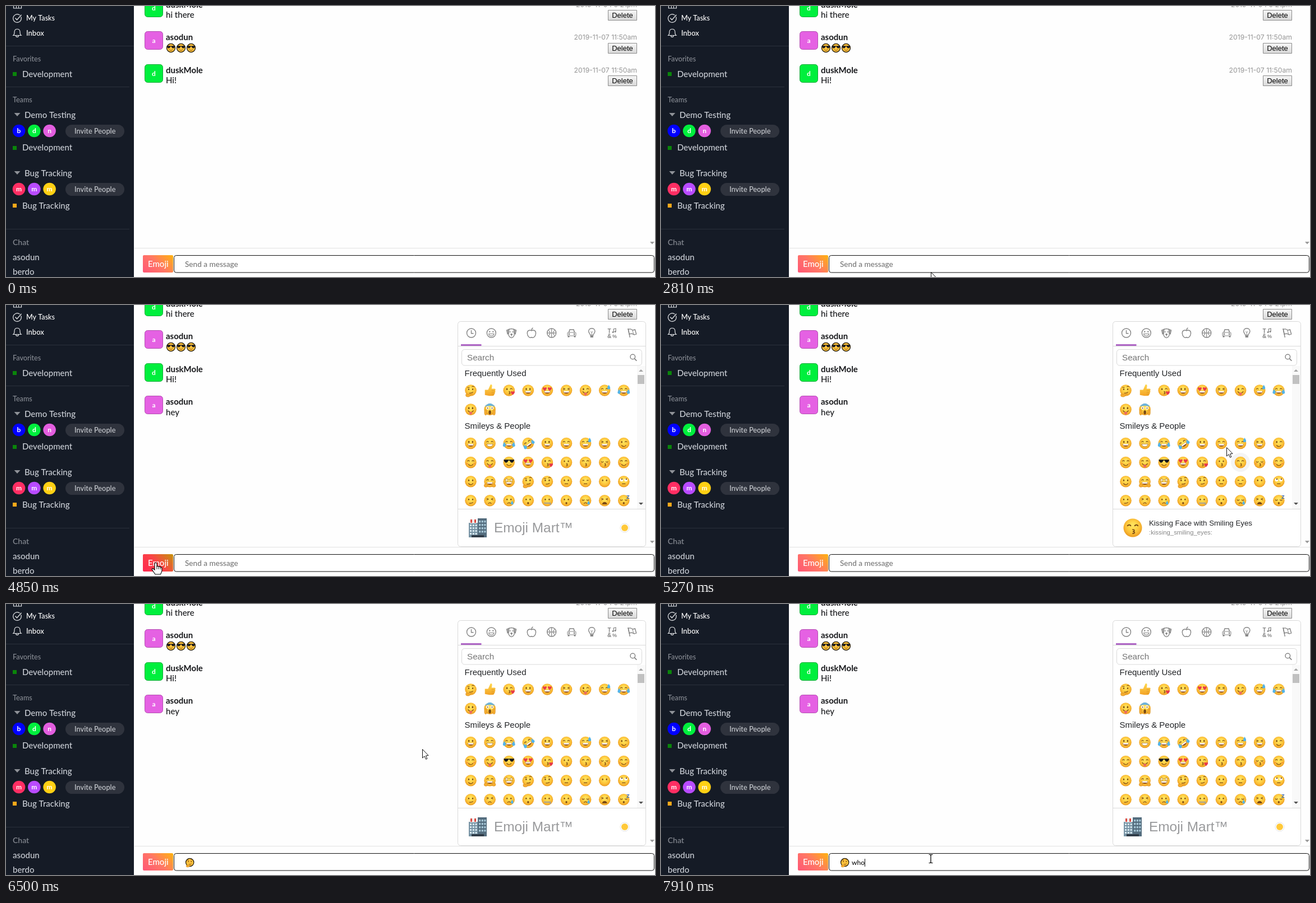
Animation of 1157x484 px, one loop 8 s. Source, as an HTML page with a canvas:

```html
<!DOCTYPE html>
<html lang="en">
<head>
<meta charset="utf-8">
<title>Team chat</title>
<style>
html, body { margin: 0; width: 100%; height: 100%; overflow: hidden; background: #fefefe; }
canvas { display: block; width: 1157px; height: 484px; }
</style>
</head>
<body>
<canvas id="stage" width="1157" height="484"></canvas>
<script>
const ctx = document.getElementById('stage').getContext('2d');
const LOOP = 8000;
const STEP = 30;
const TAU = Math.PI * 2;
const LATO = 'Lato, "Open Sans", sans-serif';
const SANS = '"Liberation Sans", Arial, sans-serif';
const INTER = 'Inter, sans-serif';
const BROWN = '#7a4a14';

// ---------- helpers ----------
function text(str, x, y, size, color, family = LATO, weight = 500, align = 'left') {
  ctx.font = `${weight} ${size}px ${family}`;
  ctx.textAlign = align;
  ctx.fillStyle = color;
  ctx.fillText(str, x, y);
}
function rect(x, y, w, h, color) {
  ctx.fillStyle = color;
  ctx.fillRect(x, y, w, h);
}
function paint(fill, stroke, width = 1) {
  if (fill) { ctx.fillStyle = fill; ctx.fill(); }
  if (stroke) { ctx.strokeStyle = stroke; ctx.lineWidth = width; ctx.stroke(); }
}
function box(x, y, w, h, r, fill, stroke) {
  ctx.beginPath();
  ctx.roundRect(x, y, w, h, r);
  paint(fill, stroke);
}
function oval(x, y, rx, ry, fill, stroke, width) {
  ctx.beginPath();
  ctx.ellipse(x, y, rx, ry, 0, 0, TAU);
  paint(fill, stroke, width);
}
function disc(x, y, r, fill, stroke, width) { oval(x, y, r, r, fill, stroke, width); }
function arc(x, y, r, from, to, color, width = 1.2) {
  ctx.beginPath();
  ctx.arc(x, y, r, from * Math.PI, to * Math.PI);
  paint(null, color, width);
}
function poly(points, fill, stroke, width, closed = true) {
  ctx.beginPath();
  for (let i = 0; i < points.length; i += 2) ctx.lineTo(points[i], points[i + 1]);
  if (closed) ctx.closePath();
  paint(fill, stroke, width);
}
function line(points, color, width = 1) { poly(points, null, color, width, false); }
function path(d, fill, stroke, width = 1) {
  const p = new Path2D(d);
  if (fill) { ctx.fillStyle = fill; ctx.fill(p); }
  if (stroke) { ctx.strokeStyle = stroke; ctx.lineWidth = width; ctx.stroke(p); }
}
function at(x, y, scale, draw) {
  ctx.save();
  ctx.translate(x, y);
  ctx.scale(scale, scale);
  draw();
  ctx.restore();
}
function blend(gradient, colors) {
  colors.forEach((c, i) => gradient.addColorStop(i / (colors.length - 1), c));
  return gradient;
}
function ramp(x0, y0, x1, y1, ...colors) {
  return blend(ctx.createLinearGradient(x0, y0, x1, y1), colors);
}

// ---------- emoji faces, drawn in a circle of radius 10 ----------
const both = draw => [-1, 1].forEach(draw);
function heart(x, y, s) {
  at(x, y, s, () => path('M0 3C-5 -1 -2.5 -4 0 -1.6C2.5 -4 5 -1 0 3Z', '#e83a48'));
}
function drop(x, y, s) {
  at(x, y, s, () => path('M0 -3C1 -1 2 0 2 1.3A2 2 0 0 1 -2 1.3C-2 0 -1 -1 0 -3Z', '#52b4ea'));
}
const wideEye = (s, r) => disc(s * 3.8, -2.6, r, '#fff');
const eyes = {
  d: () => both(s => oval(s * 3.4, -2, 1.1, 1.5, BROWN)),
  o: () => both(s => oval(s * 3.2, -2.4, 1.2, 1.8, BROWN)),
  u: () => both(s => arc(s * 3.9, -1.3, 1.9, 1.08, 1.92, BROWN)),
  n: () => both(s => arc(s * 4, -2.2, 1.9, 0.08, 0.92, BROWN)),
  x: () => both(s => line([s * 5.6, -4, s * 2.5, -2.4, s * 5.6, -1], BROWN, 1.1)),
  w: () => { oval(-3.5, -2.2, 1.2, 1.7, BROWN); arc(3.9, -1.3, 1.9, 1.08, 1.92, BROWN); },
  h: () => both(s => heart(s * 4.3, -2.6, 1.15)),
  s: () => both(s => {
    const star = [];
    for (let i = 0; i < 10; i++) {
      const a = i * Math.PI / 5 - Math.PI / 2, r = i % 2 ? 1.6 : 3.7;
      star.push(s * 4 + r * Math.cos(a), -2.4 + r * Math.sin(a));
    }
    poly(star, '#f7eccb', '#b8822a', 0.7);
  }),
  g: () => {
    rect(-9, -4.6, 18, 1.4, '#17181c');
    both(s => path(`M${s} -4.4H${s * 8.6}C${s * 8.6} 2.3 ${s * 1.4} 2 ${s} -4.4Z`, '#17181c'));
  },
  '-': () => both(s => line([s * 2, -2, s * 5.2, -2], BROWN, 1.2)),
  r: () => both(s => { wideEye(s, 2.7); disc(s * 3.8 + 0.6, -4, 1.2, BROWN); }),
  k: () => both(s => { wideEye(s, 2.5); disc(s * 3.8, -2.4, 1, BROWN); })
};
const GRIN = 'M-5.4 1.2H5.4C5 7.2 -5 7.2 -5.4 1.2Z';
const mouths = {
  g: () => { path(GRIN, '#8c4a20'); path('M-4.9 1.3H4.9L4.2 3.6H-4.2Z', '#fff'); },
  t: () => path(GRIN, '#fff', '#96601f', 0.7),
  s: () => arc(0, 0.8, 4.6, 0.17, 0.83, BROWN),
  k: () => path('M-0.5 1.8C3 1.8 1.8 4 0 4C2.8 4 2.8 6.2 -0.5 6.2', null, BROWN, 1),
  o: () => oval(0, 4.4, 1.6, 1.9, BROWN),
  '-': () => line([-3, 4, 3, 4], BROWN, 1.2),
  _: () => {},
  f: () => arc(0, 7.2, 3.4, 1.2, 1.8, BROWN),
  T: () => {
    arc(0, -0.2, 5, 0.12, 0.88, BROWN);
    path('M-2.3 4.2H2.3V6.6A2.3 2.2 0 0 1 -2.3 6.6Z', '#ee6a62');
  },
  m: () => path('M-2.6 4.4Q1 5.2 4 3', null, BROWN, 1.2),
  z: () => { rect(-5.6, 3.4, 11.2, 1.9, '#b4b3a8'); line([-5.6, 4.4, 5.6, 4.4], '#777', 0.5); rect(4.5, 4, 1.8, 3.6, '#9a9fa3'); },
  O: () => oval(0, 5, 2.2, 3.6, BROWN),
  y: () => path('M-4.4 6.6C-3.6 1 3.6 1 4.4 6.6Z', BROWN)
};
const SKIN = '#f6ac30', SKIN_EDGE = '#cf8a20';
const extras = {
  j: () => both(s => drop(s * 8, 1.8, 1.3)),
  w: () => drop(7.2, -6, 1.25),
  q: () => drop(5.4, 3.4, 1.1),
  c: () => heart(6.6, 4.4, 1.15),
  b: () => both(s => oval(s * 6.3, 2.2, 2, 1.3, 'rgba(240,100,50,.4)')),
  B: () => { line([-6, -5, -2, -5.2], BROWN); line([1.8, -6, 4, -7.2, 6.2, -6.2], BROWN); },
  H: () => path('M-8 10.4C-10 6 -6.6 5 -5.2 7L1.6 5.2C3.4 4.9 3.4 6.8 2 7.1L-1 8C0 10.6 -4 12.4 -8 10.4Z', SKIN, SKIN_EDGE, 0.6),
  h: () => both(s => oval(s * 6.8, 7, 3.2, 2.8, SKIN, SKIN_EDGE, 0.6)),
  l: () => {
    path('M-9 -5Q0 -16 9 -5Q0 -8 -9 -5Z', '#6db4dc');
    both(s => oval(s * 7.2, 5, 2.2, 4.8, SKIN, SKIN_EDGE, 0.6));
  },
  Z: () => text('Z', 4.5, -3, 9, '#3568b6', SANS, 700),
  r: () => {}
};
function thumb() {
  path('M-3 -1L1 -10C4 -11 4.6 -8.4 3 -3H8.4C10.4 -2.6 9.8 0 9 .4C10 1.4 9.6 3.2 8.6 3.6C9.2 5 8.4 6.4 7.4 6.6C7.6 8.6 6.6 9.4 4.6 9.4H-1L-8.6 8V-1Z',
    ramp(0, -10, 0, 10, '#ffd84e', '#f3a125'));
  [0.4, 3.6, 6.6].forEach(y => line([3, y, 8, y], SKIN_EDGE, 0.6));
}
function face(x, y, r, code, outlined) {
  at(x, y, r / 10, () => {
    if (code === '+') return thumb();
    if (code.includes('r', 2)) ctx.rotate(-0.6);
    if (outlined) disc(0, 0, 9.4, '#ffc23c', '#1c1509', 1.6);
    else disc(0, 0, 10, blend(ctx.createRadialGradient(0, -3, 1, 0, -1, 11), ['#ffe25e', '#ffd64b', '#fbc038', '#eb9a22']));
    eyes[code[0]]();
    mouths[code[1]]();
    for (const e of code.slice(2)) extras[e]();
  });
}

// ---------- sidebar ----------
function members(y, list) {
  list.forEach(([letter, color], i) => {
    const x = 23 + 27.3 * i;
    disc(x, y, 11.3, color);
    text(letter, x, y + 4, 12, '#fff', LATO, 700, 'center');
  });
  box(106, y - 11, 105, 23, 11.5, '#2f333d');
  text('Invite People', 122, y + 5, 12.8, '#c8cbd0');
}
function sidebar() {
  const pale = '#ccd0d7', dim = '#878b93', ink = '#e6e8ea';
  rect(0, 0, 228, 484, '#151b26');
  rect(0, 71, 228, 1, '#2b303b');
  rect(0, 144, 220, 1, '#2b303b');
  rect(0, 398, 220, 1, '#2b303b');

  line([13.5, 0, 13.5, 4, 27.5, 4, 27.5, 0], ink, 1.2);
  line([18.5, 0, 18.5, 4], ink);
  line([22.5, 0, 22.5, 4], ink);
  arc(20, 22, 7.3, -0.12, 1.72, ink);
  line([16.5, 21.5, 19.5, 24.8, 27.5, 15.8], ink, 1.3);
  path('M13 52.5C15 51 15 49 15 46.5C15 39.5 25 39.5 25 46.5C25 49 25 51 27 52.5Z', null, ink, 1.2);
  arc(20, 53, 2.3, 0, 1, ink);
  text('My Tasks', 36, 26, 12.6, '#fff');
  text('Inbox', 36, 53, 13, '#fff');

  text('Favorites', 12, 99, 12.6, dim);
  text('Teams', 12, 172, 12.6, dim);
  text('Chat', 12, 427, 14, dim);
  [126.5, 258].forEach(y => {
    rect(12, Math.floor(y) - 8, 7, 7, '#0a850a');
    text('Development', 29, y, 15, pale);
  });
  [['Demo Testing', 200], ['Bug Tracking', 304]].forEach(([name, y]) => {
    poly([14.5, y - 9, 25.5, y - 9, 20, y - 3], '#8f9298');
    text(name, 33, y, 15, pale);
  });
  members(223, [['b', '#0000ff'], ['d', '#00ef3d'], ['n', '#e35edf']]);
  members(327, [['m', '#ff2e63'], ['m', '#b94bff'], ['m', '#ffd014']]);
  rect(12, 353, 7, 7, '#ffa81a');
  text('Bug Tracking', 29, 362, 15, pale);
  text('asodun', 12, 454, 15, pale);
  text('berdo', 12, 480, 15, pale);
}

// ---------- messages ----------
const users = {
  asodun: ['#e561e3', '#b24fb0'],
  duskMole: ['#00ef3d', '#14a83a']
};
function message(top, name, body, date) {
  const [fill, edge] = users[name];
  const y = Math.round(top), low = Math.floor(top);
  box(247.5, y + 0.5, 32, 32, 5, fill, edge);
  text(name[0], 263.5, y + 21, 12, '#fff', LATO, 700, 'center');
  text(name, 285, y + 16, 15, '#17181b', LATO, 700);
  if (body) text(body, 285, low + 35, 15, '#17181b');
  else for (let i = 0; i < 3; i++) face(294 + 18 * i, y + 30, 8, 'gs', true);
  text(date, 1125, y + 15, 12.2, '#959595', INTER, 400, 'right');
  box(1073.5, low + 21.5, 51, 18, 0, ramp(0, low + 21, 0, low + 40, '#f7f7f7', '#d8d8d8'), '#8c8c8c');
  text('Delete', 1099, low + 35, 13, '#000', SANS, 400, 'center');
}
function messages(t) {
  message(-13.5, 'duskMole', 'hi there', '2019-11-04 5:21pm');
  message(45, 'asodun', '', '2019-11-07 11:50am');
  message(103.5, 'duskMole', 'Hi!', '2019-11-07 11:50am');
  if (t >= 4220) message(162, 'asodun', 'hey', '2019-11-07 11:51am');
  poly([1148, 421, 1156, 421, 1152, 425.5], '#9a9a9a');
}

// ---------- composer ----------
const typing = [[7910, ' who'], [7830, ' wh'], [7740, ' w'], [7510, ' '], [0, '']];
const inButton = (x, y) => x >= 244 && x < 298 && y >= 445 && y < 476;
const inInput = (x, y) => x >= 299 && x < 1156 && y >= 446 && y < 474;

function composer(t, hot) {
  rect(229, 432, 928, 1, '#e2e2e2');
  const colors = hot ? ['#ff2750', '#fa4447', '#c6920c'] : ['#ff5676', '#ff7765', '#ffb110'];
  box(244, 445, 54, 31, 2, ramp(250, 482, 292, 440, ...colors));
  text('Emoji', 253, 466, 15, '#fff');
  box(299.5, 445.5, 856, 30.5, 4, '#fff', '#111');
  if (t < 6330) {
    text('Send a message', 319, 465.5, 13.6, '#757575');
    return;
  }
  face(327.7, 461.5, 7.6, 'dmHB', true);
  const typed = typing.find(([from]) => t >= from)[1];
  const word = typed.trim();
  text(word, 340, 466, 12, '#111');
  if (t >= 7400) rect(Math.round(typed ? 340 + ctx.measureText(word).width : 336), 455, 1, 14, '#111');
}

// ---------- emoji picker ----------
const recent = ['dmHB + wkc og hg xg wT ugw ugj', 'oT kOl'];
const people = [
  'og ut ugj ugjr og ug ugw xg ws',
  'usb uT gs hg wkc dk uk nkb usb',
  'ds ugh sg dmHB dmB d- -- d_ r-',
  'dm xf dfq do dz do nfq xy noZ'
];
const previews = {
  uk: ['Kissing Face with Smiling Eyes', ':kissing_smiling_eyes:', 1033, 281],
  oT: ['Face with Stuck-out Tongue', ':stuck_out_tongue:', 828.5, 186.5],
  dmHB: ['Thinking Face', ':thinking_face:', 828.5, 152.5]
};
const hovers = [[6360, null], [5580, 'dmHB'], [5340, 'oT'], [5230, 'uk'], [0, null]];

function grid(rows, top) {
  rows.forEach((row, j) => row.split(' ').forEach((code, i) =>
    face(828.5 + 34.1 * i, top + 34.1 * j, 10.3, code)));
}
const GRAY = '#858585';
const tabs = [
  () => { disc(0, 0, 8, null, GRAY, 1.4); line([0, -5, 0, 0.7, 4, 0.7], GRAY, 1.4); },
  () => {
    disc(0, 0, 8, null, GRAY, 1.4);
    both(s => disc(s * 3, -2.2, 1.2, GRAY));
    path('M-4.6 1.5H4.6C4 6.6 -4 6.6 -4.6 1.5Z', null, GRAY, 1.2);
  },
  () => {
    path('M-5 -6Q0 -9 5 -6V4Q3 8.5 0 8.5Q-3 8.5 -5 4Z', null, GRAY, 1.4);
    both(s => {
      path(`M${s * 4} -7L${s * 8.5} -5L${s * 7} 2L${s * 5} 0Z`, '#aaa', GRAY, 1.2);
      disc(s * 2.4, -2, 1.1, GRAY);
    });
    oval(0, 2.5, 2, 1.4, GRAY);
    line([0, 3, 0, 6], GRAY);
  },
  () => {
    path('M0 -4C-3 -6 -8 -5 -7.6 1C-7 7 -3 9.6 0 7.6C3 9.6 7 7 7.6 1C8 -5 3 -6 0 -4Z', null, GRAY, 1.4);
    path('M0 -4Q0 -8 2.6 -9', null, GRAY, 1.4);
  },
  () => {
    disc(0, 0, 8, null, GRAY, 1.4);
    line([0, -8, 0, 8], GRAY, 1.2);
    line([-8, 0, 8, 0], GRAY, 1.2);
    arc(-9, 0, 6, -0.28, 0.28, GRAY);
    arc(9, 0, 6, 0.72, 1.28, GRAY);
  },
  () => {
    path('M-5 -1L-3.5 -6H3.5L5 -1', null, GRAY, 1.5);
    box(-7.5, -1, 15, 6, 1, null, GRAY);
    both(s => { disc(s * 4.6, 2, 1.4, GRAY); rect(s * 5.5 - 1.5, 5, 3, 2.6, GRAY); });
  },
  () => {
    path('M-2.6 4C-2.6 1.5 -5.6 0 -5.6 -3C-5.6 -10 5.6 -10 5.6 -3C5.6 0 2.6 1.5 2.6 4Z', null, GRAY, 1.4);
    line([-2, -3, 0, -1, 2, -3], GRAY);
    line([0, -1, 0, 4], GRAY);
    rect(-2.6, 5, 5.2, 3, GRAY);
  },
  () => {
    text('T', -4.5, -0.5, 10, GRAY, SANS, 700, 'center');
    line([3, -2, 3, -7, 7, -8, 7, -3], GRAY, 1.2);
    both(s => disc(4 + s * 2, -2 - s * 0.5, 1.5, GRAY));
    text('&', -4.5, 8.5, 10, GRAY, SANS, 700, 'center');
    text('%', 5, 8.5, 9, GRAY, SANS, 700, 'center');
  },
  () => {
    line([-7, -8, -3.5, 8], GRAY, 1.4);
    path('M-6.5 -6.5Q-3 -8 -0.5 -6Q2 -4.5 5.5 -6L7.8 2Q4 4 2 2Q-0.5 0.5 -4.8 2Z', null, GRAY, 1.4);
    line([1, -5, 3, 3], GRAY);
  }
];
function store() {
  rect(-16, -9, 16, 26, '#7793a4');
  rect(0, -17, 16, 34, '#546d7e');
  rect(-14, -15, 12, 7, '#eef2f4');
  rect(-13, -15, 3, 6, '#dc4c43');
  rect(-6, -15, 3, 6, '#dc4c43');
  for (let j = 0; j < 4; j++) {
    for (let i = 0; i < 3; i++) {
      rect(-14 + i * 4.8, -6 + j * 5, 3, 3, '#d8e8ef');
      rect(2.2 + i * 4.6, -13 + j * 6, 3, 3.5, '#a9c9d8');
    }
  }
  rect(-11, 13, 22, 4, '#303c48');
}
function picker(hover) {
  const edge = '#d9d9d9';
  box(805.5, 29.5, 335, 402, 5, '#fff', edge);
  tabs.forEach((draw, i) => at(829.5 + 35.8 * i, 50, 1, draw));
  rect(806, 73, 334, 1, edge);
  rect(811, 70, 36.5, 3, '#ae65c5');
  box(812.5, 79.5, 321, 28.5, 5, '#fff', edge);
  text('Search', 822, 98.5, 15.2, '#757575', SANS);
  disc(1117.3, 92.5, 4.3, null, '#777', 1.3);
  line([1120.5, 95.8, 1124.3, 99.8], '#777', 1.6);

  ctx.save();
  ctx.beginPath();
  ctx.rect(806, 109, 334, 255);
  ctx.clip();
  rect(1125, 109, 15, 255, '#f9f9f9');
  rect(1126, 125, 12, 16, '#c1c1c1');
  poly([1128, 119, 1136, 119, 1132, 115], '#a3a3a3');
  poly([1128, 353, 1136, 353, 1132, 357], '#505050');
  text('Frequently Used', 817.5, 126.5, 15, '#222427', SANS);
  text('Smileys & People', 817.5, 221, 15, '#222427', SANS);
  const info = previews[hover];
  if (info) disc(info[2], info[3], 17, '#f4f4f4');
  grid(recent, 152.5);
  grid(people, 247);
  ctx.restore();

  rect(806, 364, 334, 1, edge);
  if (info) {
    face(841, 398, 16.5, hover);
    text(info[0], 870, 394, 13.3, '#222427', SANS);
    text(info[1], 870, 410, 11.35, '#888', SANS);
  } else {
    at(841, 398, 1, store);
    text('Emoji Mart™', 870, 406, 24.4, '#999a9c', SANS);
    disc(1103, 398, 8, '#fff', '#e4e4e4');
    disc(1103, 398, 6, '#ffc93a');
  }
}

// ---------- pointer ----------
const track = [
  [0, 1080, 510], [529, 1080, 510], [530, 1080, 470], [560, 1080, 450], [590, 1079, 434],
  [850, 1079, 434], [960, 1040, 448], [1089, 983, 483], [1090, 983, 510],
  [2809, 481, 510], [2810, 481, 475], [2900, 470, 459], [3050, 432, 450], [3190, 400, 456],
  [3490, 400, 456], [3580, 350, 468], [3680, 292, 465], [3760, 267, 460],
  [5050, 267, 460], [5110, 480, 430], [5170, 820, 350], [5230, 1036, 283], [5270, 1008, 254],
  [5310, 930, 222], [5360, 836, 190], [5560, 836, 190], [5680, 838, 166], [5900, 832, 156],
  [6330, 832, 156], [6440, 786, 214], [6560, 697, 304], [6680, 450, 420], [6800, 268, 464],
  [6860, 249, 463], [6960, 330, 466], [7120, 490, 449],
  [7150, 490, 449], [7300, 481, 455], [8000, 481, 455]
];
// The pointer advances in short holds rather than gliding.
function pointerAt(t) {
  const i = track.findIndex(k => k[0] > t);
  const [t0, x0, y0] = track[i - 1], [t1, x1, y1] = track[i];
  const p = Math.floor((t - t0) / STEP) * STEP / (t1 - t0);
  return [Math.round(x0 + (x1 - x0) * p), Math.round(y0 + (y1 - y0) * p)];
}
function pointer(x, y) {
  at(x, y, 1, () => {
    if (inButton(x, y)) {
      path('M-2 1.5Q0 -1 2 1.5V7Q4 5.6 5.4 7.5Q7.4 6.4 8.6 8.4Q11 7.6 11 10.4V15L8.6 21H-1L-6.4 13Q-7.4 10.4 -5 10.6L-2 13Z', '#fff', '#000', 1.1);
      [2, 5.4, 8.6].forEach(dx => line([dx, 7, dx, 12], '#000', 0.9));
    } else if (inInput(x, y)) {
      line([0, -7, 0, 7], '#000', 1.3);
      both(s => line([-3.5, s * 7.5, -1, s * 7.5, 0, s * 6.5, 1, s * 7.5, 3.5, s * 7.5], '#000', 1.1));
    } else {
      poly([0.5, 0.5, 0.5, 16, 4, 12.8, 6.6, 18.3, 8.9, 17.2, 6.4, 12, 11, 11.5], '#fff', '#111', 1);
    }
  });
}

function render(now) {
  const t = now % LOOP;
  const [x, y] = pointerAt(t);
  rect(0, 0, 1157, 484, '#fefefe');
  messages(t);
  sidebar();
  composer(t, inButton(x, y));
  if (t >= 4680) picker(hovers.find(([from]) => t >= from)[1]);
  pointer(x, y);
  requestAnimationFrame(() => render(performance.now()));
}
render(performance.now());
</script>
</body>
</html>
```
